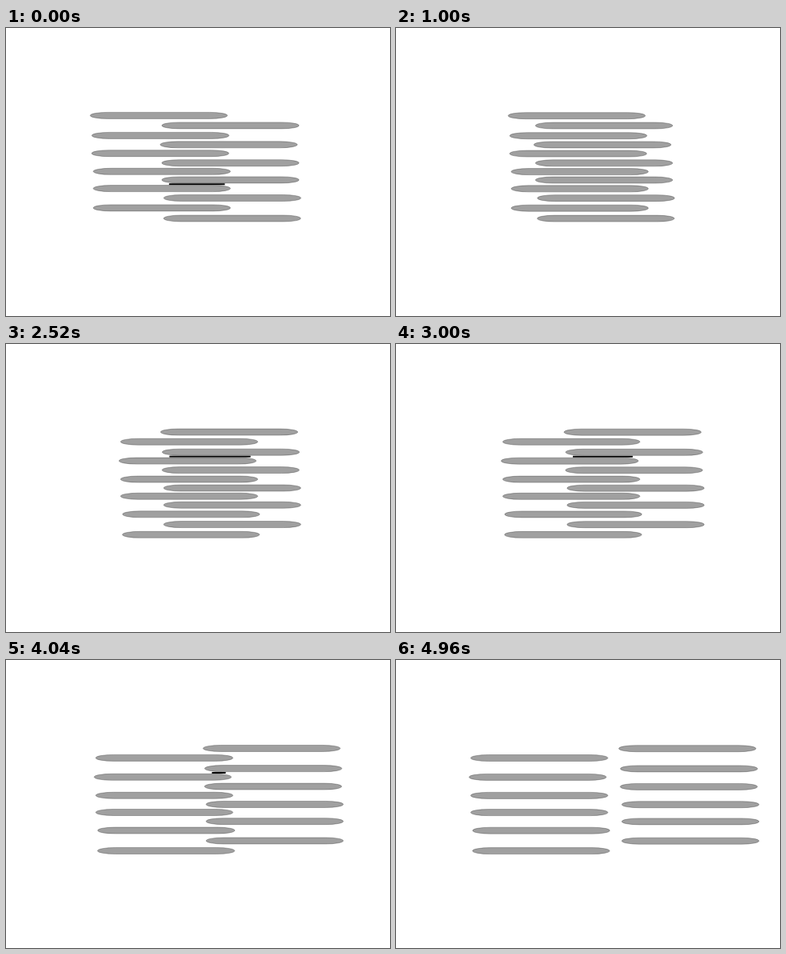
These frames come from a looping animation (480x360 px, 5000 ms). An HTML page:

```html
<!DOCTYPE html>
<html lang="en">
<head>
<meta charset="utf-8">
<title>Sliding bars</title>
<style>
html, body { margin: 0; width: 100%; height: 100%; overflow: hidden; background: #fff; }
svg { display: block; width: 100vw; height: 100vh; }
.bar { fill: #a0a0a0; stroke: #333; stroke-width: .6; stroke-opacity: .6; }
</style>
</head>
<body>
<svg id="stage" viewBox="0 0 480 360"></svg>
<script>
const LOOP = 5000, STEP = 40, LAST = LOOP - STEP;
const WIDTH = 171.4, HALF = 4, TIP = 22;
const stage = document.getElementById('stage');

function add(tag, attrs) {
  const el = document.createElementNS('http://www.w3.org/2000/svg', tag);
  for (const k in attrs) el.setAttribute(k, attrs[k]);
  stage.append(el);
  return el;
}

// Each row: horizontal offset, first and last centre height
const right = { from: 105.3, to: 278.5, rows: [
  [0, 109.4, 110.7], [2, 134.4, 135.9], [1.8, 156.7, 158.4],
  [3.8, 179.3, 180.7], [3.8, 200.6, 201.9], [3.8, 224.9, 226.2]] };
const left = { from: 194.8, to: 93.4, rows: [
  [0, 121.9, 122.5], [-2, 145.8, 146.4], [0, 168.7, 169.4],
  [0, 189.9, 190.6], [2.4, 212.5, 213.2], [2.2, 238, 238.6]] };

const gaps = [
  { a: [right, 1], b: [left, 1], start: 2100, end: 4480 },
  { a: [left, 3], b: [right, 4], start: 0, end: 520 }
];
for (const g of gaps) g.el = add('rect', { fill: '#000', height: 2 });

for (const set of [right, left])
  set.els = set.rows.map(() => add('rect', {
    class: 'bar', width: WIDTH, height: HALF * 2, rx: TIP, ry: HALF }));

const mix = (a, b, p) => a + (b - a) * p;

function place([set, i], p) {
  const [dx, y0, y1] = set.rows[i];
  return { x: mix(set.from, set.to, p) + dx, y: mix(y0, y1, p) };
}

function draw(time) {
  const t = Math.floor((time % LOOP) / STEP) * STEP;
  const p = t / LAST;
  for (const set of [right, left]) {
    set.els.forEach((el, i) => {
      const { x, y } = place([set, i], p);
      el.setAttribute('x', x);
      el.setAttribute('y', y - HALF);
    });
  }
  for (const g of gaps) {
    const a = place(g.a, p), b = place(g.b, p);
    const x = Math.max(a.x, b.x) + 9;
    const w = Math.min(a.x, b.x) + WIDTH - 7 - x;
    const on = t >= g.start && t < g.end && w > 0;
    g.el.setAttribute('x', x);
    g.el.setAttribute('y', (a.y + b.y) / 2 - 1);
    g.el.setAttribute('width', on ? w : 0);
  }
}

const begin = performance.now();
function tick() {
  draw(performance.now() - begin);
  requestAnimationFrame(tick);
}
draw(0);
requestAnimationFrame(tick);
</script>
</body>
</html>
```
